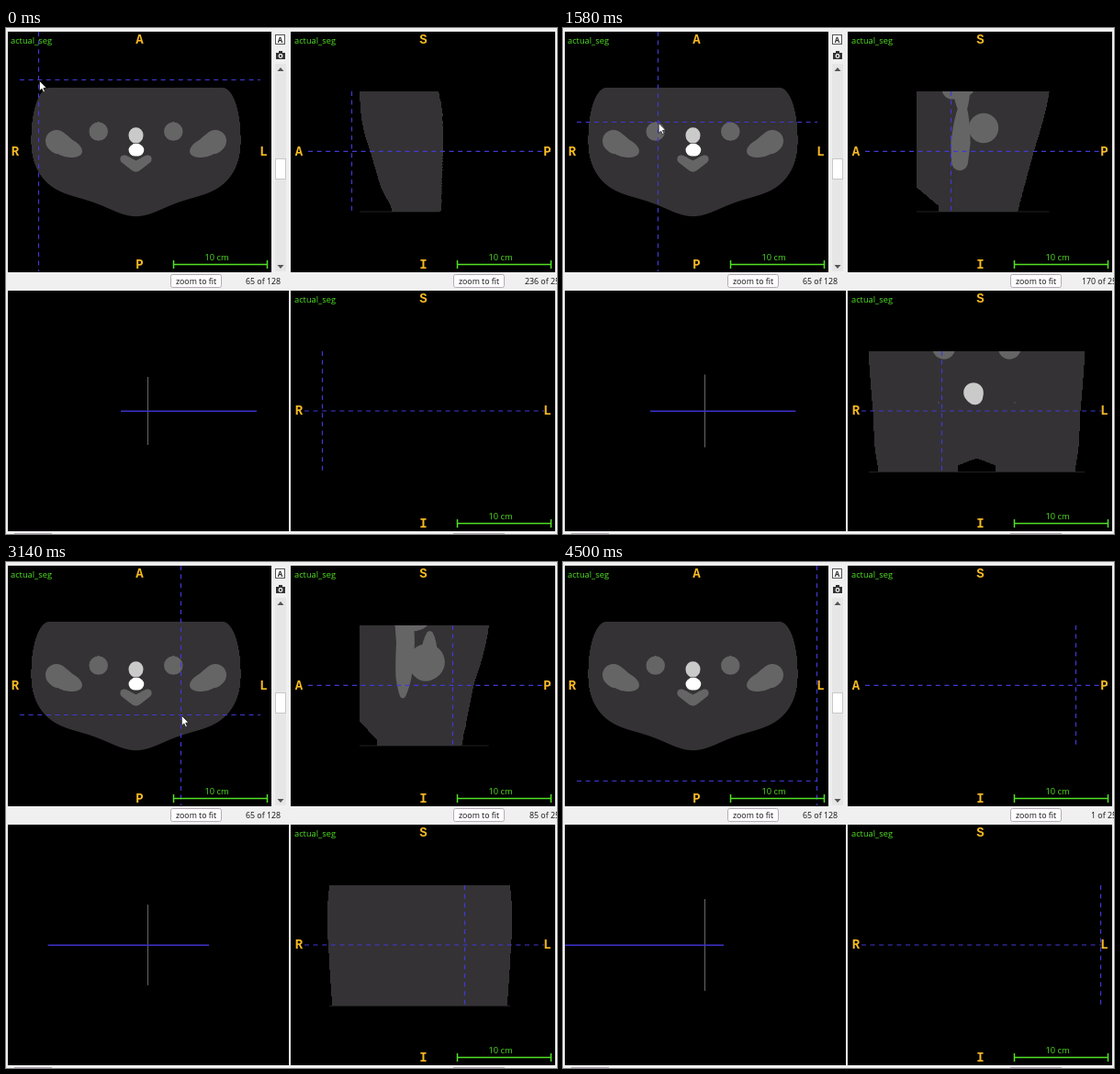
Recreate the animation shown at these times as an HTML page with a canvas. Size 600 by 551 pixels, loop 4520 ms.

```html
<!DOCTYPE html>
<html lang="en">
<head>
<meta charset="utf-8">
<title>Slice viewer</title>
<style>
html, body { margin: 0; width: 100%; height: 100%; overflow: hidden; background: #f0f0f0; }
canvas { display: block; }
</style>
</head>
<body>
<canvas id="stage" width="600" height="551"></canvas>
<script>
const ctx = document.getElementById('stage').getContext('2d');
const LOOP = 4520, MID = 141.5, TOP = 69, BOTTOM = 200, PLANE = 134;
const TISSUE = '#343234', BONE = '#656565', BLADDER = '#9a9a9a', GLAND = '#cacaca';
const BLUE = '#4238d6', GREEN = '#52e024', AMBER = '#f6b923';
const UI = '8.8px "Open Sans", "Noto Sans", sans-serif', LABEL = '9.3px "Open Sans", "Noto Sans", sans-serif';

const mix = (a, b, u) => a + (b - a) * u;
const clamp = v => Math.min(1, Math.max(0, v));
const rect = (color, x, y, w, h) => { ctx.fillStyle = color; ctx.fillRect(x, y, w, h); };

function text(str, x, y, color, font, align = 'left') {
  ctx.font = font; ctx.fillStyle = color; ctx.textAlign = align;
  ctx.fillText(str, x, y);
}
function line(x1, y1, x2, y2, color = BLUE, width = 1.2, dash = []) {
  ctx.strokeStyle = color; ctx.lineWidth = width; ctx.setLineDash(dash);
  ctx.beginPath(); ctx.moveTo(x1, y1); ctx.lineTo(x2, y2); ctx.stroke();
  ctx.setLineDash([]);
}
const dashed = (x1, y1, x2, y2) => line(x1, y1, x2, y2, BLUE, 1.2, [5, 4.6]);

function poly(color, p) {
  ctx.fillStyle = color; ctx.beginPath();
  for (let i = 0; i < p.length; i += 2) ctx.lineTo(p[i], p[i + 1]);
  ctx.closePath(); ctx.fill();
}
function disc(color, x, y, r) {
  ctx.fillStyle = color; ctx.beginPath(); ctx.arc(x, y, r, 0, 7); ctx.fill();
}

// The body is a volume: x across, y front to back, z downwards.
// Its skin is a front and a back depth at distance d from the middle.
const BACK = [[100, 112, 2.3, 5], [125, 60, 4.5, 20], [127, 52, 4.5, -10]];  // base, bulge, squareness, seat

function skin(d, z) {
  const s = (z - TOP) / (BOTTOM - TOP), width = 118 - 4 * clamp(2 * s);
  if (d >= width) return null;
  const flat = 105 - 35 * s ** 1.7, corner = Math.max(0, (d - flat) / (width - flat));
  const legs = 60 * clamp((z - 173) / 20) * Math.exp(-d / 42);
  const front = 65 + (40 + 30 * s) * (1 - Math.sqrt(1 - corner * corner)) + legs;
  const row = s < .5 ? 0 : 1;
  const [base, bulge, square, seat] = BACK[row].map((v, i) => mix(v, BACK[row + 1][i], 2 * s - row));
  const back = base + bulge * Math.sqrt(1 - (d / width) ** square) + seat * Math.exp(-((d / 40) ** 2));
  return front < back ? [front, back] : null;
}

// Organs are chains of balls: x, y, z, radius
const paired = [
  [[91, 138, 109, 20], [80, 135, 121, 13], [66, 130, 130, 11], [55, 123, 134, 12], [60, 130, 145, 12], [60, 140, 168, 11], [60, 145, 202, 10]],
  [[106, 104, 66, 12], [81, 142, 64, 9], [88, 141, 95, 10]],
  [[97, 114, 69, 11], [94, 115, 88, 10], [100, 113, 125, 11], [102, 112, 147, 9]],
  [[112, 84, 64, 9], [126, 84, 72, 9], [MID, 86, 72, 10]],
  [[128, 142, 139, 6], [125, 130, 154, 5]],
  [[129, 143, 136, 5], [MID, 151, 135, 6]],
  [[115, 150, 121, 6], [MID, 156, 121, 7]]];
const flip = chain => chain.map(([x, ...rest]) => [2 * MID - x, ...rest]);
const organs = [
  ...paired.flatMap(chain => [[BONE, chain], [BONE, flip(chain)]]),
  [BLADDER, [[131, 121, 101, 10], [153, 121, 101, 10], [157, 148, 109, 11], [133, 146, 110, 11], [131, 121, 101, 10], [145, 134, 106, 13]]],
  [GLAND, [[138, 104, 114, 11], [MID, 114, 125, 10], [MID, 119, 137, 7]]],
  ['#fff', [[140, 133, 133, 6.5], [144, 133, 135, 6.5]]]];

// Cut every ball with the plane where the given axis equals pos
function cutOrgans(axis, pos, project) {
  const STEPS = 24;
  for (const [color, chain] of organs) {
    ctx.fillStyle = color; ctx.beginPath();
    for (let i = 0; i < (chain.length - 1) * STEPS; i++) {
      const k = Math.floor(i / STEPS), ball = chain[k].map((v, j) => mix(v, chain[k + 1][j], i % STEPS / STEPS));
      const cut = ball[3] ** 2 - (ball[axis] - pos) ** 2;
      if (cut <= 0) continue;
      const [x, y] = project(ball), r = Math.sqrt(cut);
      ctx.moveTo(x + r, y); ctx.arc(x, y, r, 0, 7);
    }
    ctx.fill();
  }
}
function clipped(x, y, w, h, paint) {
  ctx.save(); ctx.beginPath(); ctx.rect(x, y, w, h); ctx.clip();
  paint();
  ctx.restore();
}

function axial() {
  for (let x = 24; x < 260; x++) {
    const s = skin(Math.abs(x + .5 - MID), PLANE);
    if (s) rect(TISSUE, x, s[0], 1, s[1] - s[0]);
  }
  cutOrgans(2, PLANE, ([x, y]) => [x, y]);
}

function side(x) {
  const d = Math.abs(x - MID), top = skin(d, TOP);
  if (!top) return;
  rect('#202022', 385, BOTTOM - .5, top[1] - 65, 1);
  for (let z = TOP; z < BOTTOM; z++) {
    const s = skin(d, z);
    if (s) rect(TISSUE, Math.round(s[0]) + 320, z, Math.round(s[1] - s[0]), 1);
  }
  clipped(311, TOP, 287, BOTTOM - TOP, () => cutOrgans(0, x, ([, y, z]) => [y + 320, z]));
}

function frontal(y) {
  for (let z = TOP; z <= BOTTOM; z++) {
    let inner = -1, outer = -1;
    for (let d = 0; d < 119; d++) {
      const s = skin(d, z === BOTTOM ? TOP : z);
      if (!s || y < s[0] || y > s[1]) continue;
      if (inner < 0) inner = d;
      outer = d;
    }
    if (inner < 0) continue;
    const color = z === BOTTOM ? '#202022' : TISSUE, w = outer - inner + 1;
    rect(color, 450 - outer, z + 283, w, 1);
    rect(color, 450 + inner, z + 283, w, 1);
  }
  clipped(311, TOP + 283, 287, BOTTOM - TOP, () => cutOrgans(1, y, ([x, , z]) => [x + 309, z + 283]));
}

function markers(x, y, [top, left, right, bottom]) {
  const mark = (s, dx, dy) => text(s, x + dx, y + dy, AMBER, 'bold 14px "Liberation Mono", monospace', 'center');
  mark(top, 143.5, 12.5); mark(bottom, 143.5, 258);
  mark(left, 8, 134.5); mark(right, 278.5, 134.5);
  text('actual_seg', x + 3, y + 13, GREEN, LABEL);
  const bar = y + 253.5;
  line(x + 180.5, bar, x + 282.5, bar, GREEN, 1.5);
  for (const end of [180.5, 282.5]) line(x + end, bar - 4.5, x + end, bar + 4.5, GREEN, 1.5);
  text('10 cm', x + 227.5, bar - 5, GREEN, LABEL, 'center');
}

function button(x) {
  ctx.beginPath(); ctx.roundRect(x + .5, 268.5, 55, 14, 2);
  ctx.fillStyle = '#fdfdfd'; ctx.fill();
  ctx.strokeStyle = '#b5acb5'; ctx.lineWidth = 1; ctx.stroke();
  text('zoom to fit', x + 28, 278.8, '#111', UI, 'center');
}

function chrome(slice) {
  rect('#f0f0f0', 0, 0, 600, 551);
  for (const y of [4, 286]) rect('#000', 310, y, 288, 262);
  rect('#000', 2, 4, 287, 262);
  rect('#000', 2, 286, 306, 262);
  rect('#e6e6e6', 293, 39, 12, 226);
  rect('#c8c8c8', 293, 142, 12, 23); rect('#fff', 294, 143, 10, 21);
  poly('#555', [295.5, 47, 299, 43, 302.5, 47]);
  poly('#555', [295.5, 258, 299, 262, 302.5, 258]);
  rect('#555', 293, 7, 11, 11); rect('#fff', 294, 8, 9, 9);
  text('A', 298.5, 15.5, '#222', 'bold 8px "Open Sans", sans-serif', 'center');
  rect('#333', 294, 27, 10, 7); rect('#333', 297, 25, 4, 2);
  disc('#fff', 299, 30.5, 2.4); disc('#333', 299, 30.5, 1.2);
  for (const x of [179, 487]) button(x);
  text('65 of 128', 299, 278.8, '#111', UI, 'right');
  text(slice + ' of 256', 608, 278.8, '#111', UI, 'right');
  rect('#b5acb5', 9, 550, 41, 1); rect('#b5acb5', 487, 550, 56, 1);
}

function perspective(y) {
  const half = 1 / (.02703 - 3.86e-5 * (y - 56));
  const mid = 154 + half * (1.216 - .01536 * (y - 56));
  line(154.5, 417 - half, 154.5, 417 + half, '#666', 1);
  line(Math.max(2, mid - 2 * half), 417.2, mid + 2 * half, 417.2, '#3c31c8', 1.6);
}

function pointer(x, y) {
  ctx.save(); ctx.translate(x, y);
  poly('#fff', [0, 0, 0, 11, 2.5, 8.7, 4.3, 12.5, 6, 11.7, 4.3, 8, 7.5, 7.7]);
  ctx.strokeStyle = '#111'; ctx.lineWidth = .7; ctx.stroke();
  ctx.restore();
}

// Time, slice number, crosshair y
const drag = [[0, 236, 56], [960, 201, 85], [1580, 170, 102], [2160, 149, 115], [2720, 115, 142],
  [3500, 60, 186], [4320, 1, 238], [LOOP, 1, 238]];

function draw(now) {
  const t = now % LOOP, i = drag.findIndex(k => k[0] > t), [t0, s0, y0] = drag[i - 1], [t1, s1, y1] = drag[i];
  const u = ((t - t0) / (t1 - t0)) ** (i === 1 ? 1.25 : 1);
  const slice = Math.round(mix(s0, s1, u)), x = 277 - 1.0254 * slice, y = mix(y0, y1, u);
  const px = Math.round(x) + .5, py = Math.round(y) + .5;

  chrome(slice);
  axial();
  side(x);
  frontal(y);
  perspective(y);
  dashed(px, 4, px, 265);
  dashed(15, py, 277, py);
  dashed(329, 134.4, 594, 134.4);
  dashed(py + 320, TOP, py + 320, BOTTOM);
  dashed(325, 417, 586, 417);
  dashed(px + 309, 352, px + 309, 483);
  markers(2, 4, 'ARLP');
  markers(311, 4, 'SAPI');
  markers(311, 286, 'SRLI');
  if (t < 4330) pointer(x + 1.5, y + 1.5);
  requestAnimationFrame(() => draw(performance.now()));
}
draw(0);
</script>
</body>
</html>
```
